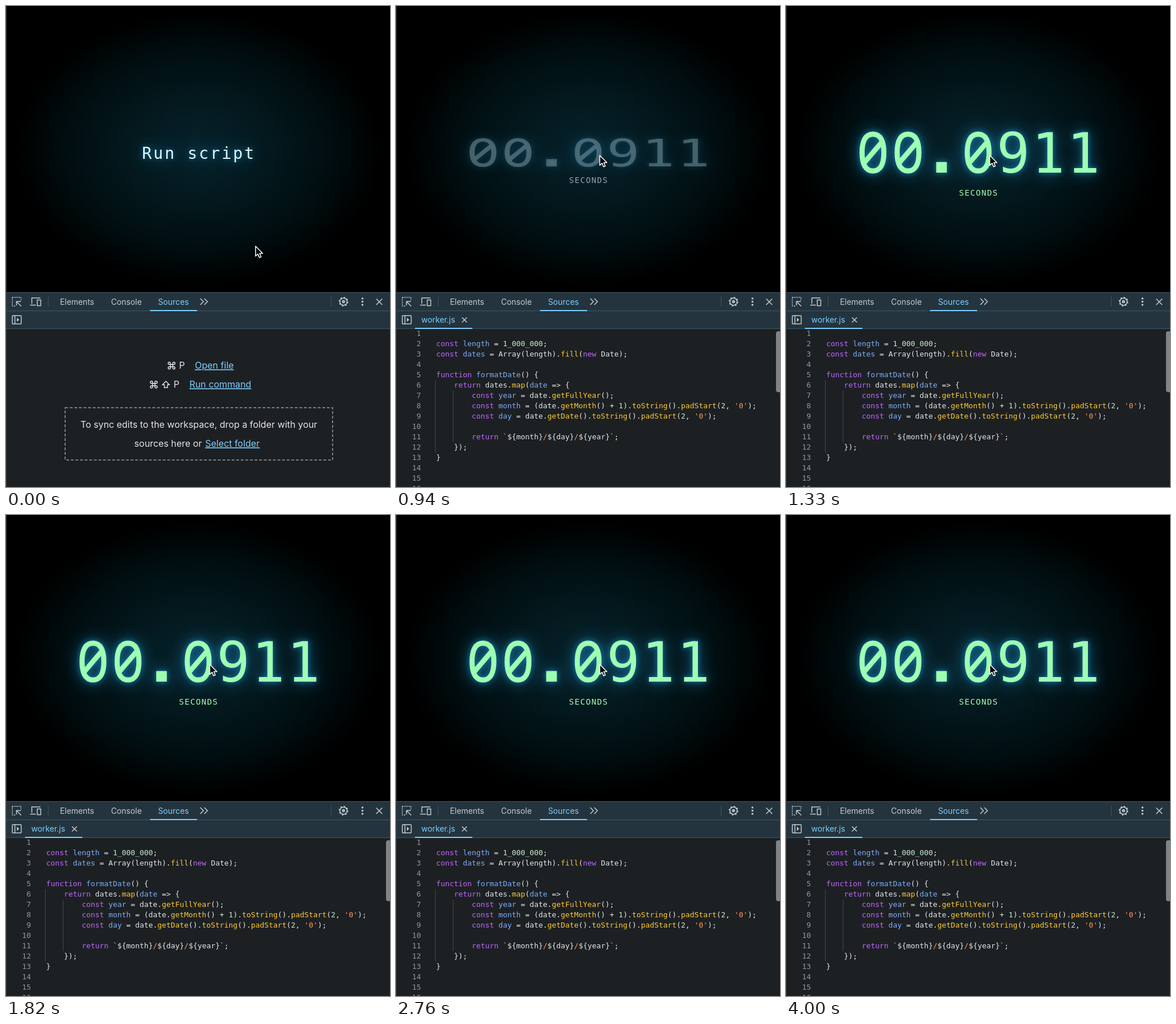
Write an HTML page that moves like this. It is 669 by 837 pixels and loops after 4.03 s.

```html
<!DOCTYPE html>
<html lang="en">
<head>
<meta charset="utf-8">
<title>Run script</title>
<style>
  html, body { margin: 0; width: 100%; height: 100%; overflow: hidden; background: #000; }
  svg { display: block; width: 669px; height: 837px; }
  text { white-space: pre; }
  .mono { font-family: "DejaVu Sans Mono", Menlo, monospace; }
  .ui { font: 13.8px Inter, sans-serif; fill: #c3cacf; }
  .active { fill: #7ccfff; }
  .help { font: 15.87px Inter, sans-serif; fill: #e3e5e7; }
  .link { fill: #7ccfff; text-decoration: underline; text-decoration-thickness: 1px; text-underline-offset: 2px; }
  .code { font-size: 12.88px; fill: #e3e5e7; }
  .number { fill: #92979b; text-anchor: end; }
  .k { fill: #bf67ff; } .d { fill: #7cacf8; } .p { fill: #fcc934; }
  .n { fill: #c4eed0; } .s { fill: #fe9a5b; }
  .icon { fill: none; stroke: #c3cacf; stroke-width: 1.5; }
</style>
</head>
<body>
<svg viewBox="0 0 669 837" xmlns="http://www.w3.org/2000/svg">
  <defs>
    <radialGradient id="vignette">
      <stop offset="0" stop-color="#06222c"/>
      <stop offset=".3" stop-color="#041a20"/>
      <stop offset=".65" stop-color="#010f12"/>
      <stop offset=".95" stop-color="#000"/>
    </radialGradient>
    <filter id="glow" filterUnits="userSpaceOnUse" x="40" y="140" width="590" height="240" color-interpolation-filters="sRGB">
      <feGaussianBlur stdDeviation="5" result="near"/>
      <feGaussianBlur in="SourceGraphic" stdDeviation="14" result="far"/>
      <feMerge><feMergeNode in="far"/><feMergeNode in="near"/></feMerge>
    </filter>
    <clipPath id="editorClip"><rect y="562" width="669" height="275"/></clipPath>
    <text id="title" class="mono" x="237" y="265.5" font-size="28" letter-spacing="2.95">Run script</text>
    <g id="digits" class="mono" font-size="96" text-anchor="middle" fill="currentColor"></g>
  </defs>

  <rect width="669" height="837"/>
  <ellipse cx="335" cy="249" rx="334" ry="249" fill="url(#vignette)"/>

  <g id="intro">
    <use id="titleGlow" href="#title" fill="#1580b0" filter="url(#glow)"/>
    <use id="titleFace" href="#title"/>
  </g>
  <g id="timer">
    <g id="counter">
      <use id="digitGlow" href="#digits" color="#1a82b4" filter="url(#glow)"/>
      <use id="digitFace" href="#digits"/>
    </g>
    <text id="unit" class="mono" x="301.5" font-size="14" letter-spacing="1.33">SECONDS</text>
  </g>

  <rect y="498" width="669" height="339" fill="#1d2023"/>
  <rect y="498" width="669" height="64" fill="#24343e"/>
  <path d="M0 498.5H669M0 530.5H669M0 561.5H669" stroke="#3f5661"/>
  <path d="M73.5 506V523M566.5 506V523" stroke="#43545e"/>
  <rect x="251" y="529" width="82" height="2" fill="#7ccfff"/>

  <g class="icon">
    <path d="M11 507H26M11 507V522H17M26 507V512" stroke-dasharray="2 1.6"/>
    <path d="M26.5 522.5L18.5 514.5M18.3 521V514.3H26"/>
    <path d="M45 518V508H60M42 520.6H52"/>
    <rect x="54.5" y="511.5" width="6" height="10"/>
    <path d="M338.5 509L344 514.5L338.5 520M345.5 509L351 514.5L345.5 520"/>
    <circle cx="588" cy="514.5" r="6.2"/>
    <circle cx="588" cy="514.5" r="7.5" stroke-width="1.6" stroke-dasharray="2.945"/>
    <circle cx="588" cy="514.5" r="1.7" stroke-width="2"/>
    <path d="M645 509.5L655.5 520M655.5 509.5L645 520"/>
    <rect x="11" y="538.8" width="15.5" height="14.5" rx="1"/>
    <path d="M15.5 539V553"/>
    <path d="M19 542.5L23 546L19 549.5Z" fill="#c3cacf" stroke="none"/>
    <g fill="#c3cacf" stroke="none">
      <circle cx="621" cy="509" r="1.7"/><circle cx="621" cy="514.5" r="1.7"/><circle cx="621" cy="520" r="1.7"/>
    </g>
  </g>
  <g class="ui">
    <text x="94" y="519.6">Elements</text>
    <text x="183" y="519.6">Console</text>
    <text x="265" y="519.6" class="active">Sources</text>
  </g>

  <g id="welcome" class="help">
    <g fill="none" stroke="#e3e5e7" stroke-width="1.4">
      <path id="command" transform="translate(288.5 625.7)" d="M-2 -2V-4a2 2 0 1 0 -2 2H4a2 2 0 1 0 -2 -2V4a2 2 0 1 0 2 -2H-4a2 2 0 1 0 2 2z"/>
      <use href="#command" x="-31" y="33"/>
      <path transform="translate(278.6 659)" d="M0 -6L6 0H2.8V5H-2.8V0H-6Z"/>
    </g>
    <text x="301.5" y="631.2">P</text>
    <text x="329" y="631.2" class="link">Open file</text>
    <text x="292" y="664.2">P</text>
    <text x="319.5" y="664.2" class="link">Run command</text>
    <rect x="103" y="699" width="466" height="91" fill="none" stroke="#777b7e" stroke-width="2" stroke-dasharray="5 3"/>
    <text x="336" y="734.2" text-anchor="middle">To sync edits to the workspace, drop a folder with your</text>
    <text x="223.5" y="767">sources here or</text>
    <text x="347" y="767" class="link">Select folder</text>
  </g>

  <g id="editor">
    <text class="ui active" x="44" y="551.2">worker.js</text>
    <path class="icon" d="M115 542L123.5 550.5M123.5 542L115 550.5"/>
    <rect x="33" y="560" width="100" height="2" fill="#7ccfff"/>
    <path d="M68.5 651V777M99.5 669V759" stroke="#43484b"/>
    <g id="lines" class="mono code" clip-path="url(#editorClip)"></g>
    <rect x="662" y="566" width="9" height="106" rx="4" fill="#808386"/>
  </g>

  <path d="M.5 0V837" stroke="#363b3e"/>

  <g id="cursor">
    <path id="arrow" d="M0 0V17.2L4 13.6L6.6 19.8L9.6 18.5L7 12.5H12.4Z" fill="#000" stroke="#fff" stroke-width="1.5" stroke-linejoin="round"/>
    <g id="hand" stroke="#000" stroke-width=".9" stroke-linejoin="round">
      <path fill="#fff" d="M-2.2 3C-2.6 .8 .6 0 1.4 2L2.8 6.4C3.2 4.8 5.4 5 5.8 6.6C6.6 5.6 8.2 6 8.5 7.4C9.6 6.6 11 7.4 11 9V13.2C10.9 15 9.8 16 9.6 18.6H1.6C1.4 16.6 -1.2 14.6 -3.2 11.6C-4.8 9.4 -2.4 8 -.6 10Z"/>
      <path fill="none" d="M3 12V16M5.4 12V16M7.8 12V16"/>
    </g>
  </g>
</svg>
<script>
const LOOP = 4030;
const MOVE_START = 80, MOVE_END = 580;
const CLICK = 835, ELAPSED = 0.0911;
const SETTLE_START = 945, SETTLE_END = 1240;
const CENTER_Y = 255;

const source = [
  "",
  "const length = 1_000_000;",
  "const dates = Array(length).fill(new Date);",
  "",
  "function formatDate() {",
  "    return dates.map(date => {",
  "        const year = date.getFullYear();",
  "        const month = (date.getMonth() + 1).toString().padStart(2, '0');",
  "        const day = date.getDate().toString().padStart(2, '0');",
  "",
  "        return `${month}/${day}/${year}`;",
  "    });",
  "}",
  "", "", ""
];

const el = id => document.getElementById(id);
const show = (id, on) => el(id).setAttribute("display", on ? "inline" : "none");
const set = (id, name, value) => el(id).setAttribute(name, value);
const mix = (a, b, k) => a + (b - a) * k;
const mixColor = (a, b, k) => `rgb(${a.map((v, i) => Math.round(mix(v, b[i], k)))})`;
const progress = (t, from, to) => Math.min(1, Math.max(0, (t - from) / (to - from)));
const easeInOut = k => k * k * (3 - 2 * k);
const easeOut = k => 1 - (1 - k) ** 3;

const token = /(?<k>\b(?:const|function|return|new)\b)|(?<d>(?<=const |function )\w+|\bdate(?= =>))|(?<p>(?<=\.)[a-z]\w*)|(?<s>'[^']*'|`|\/)|(?<n>\b\d[\d_]*)/g;

function highlight(line) {
  return line.replace(token, (match, ...rest) => {
    const groups = rest.at(-1);
    const kind = Object.keys(groups).find(key => groups[key]);
    return `<tspan class="${kind}">${match}</tspan>`;
  });
}

el("lines").innerHTML = source.map((line, i) => {
  const y = 574.2 + 17.96 * i;
  return `<text class="number" x="43.5" y="${y}">${i + 1}</text><text x="70" y="${y}">${highlight(line)}</text>`;
}).join("");

// The slashed zero and square point are drawn; other digits are text.
function digit(char, i) {
  const x = 151.5 + 61.1 * i;
  if (char === ".") return `<rect x="${x - 12}" y="271.5" width="18.5" height="18.5"/>`;
  if (char !== "0") return `<text x="${x}" y="290">${char}</text>`;
  return `<path transform="translate(${x} ${CENTER_Y})" fill="none" stroke="currentColor" stroke-width="8.8"
    d="M0 -32C13 -32 19 -20 19 0S13 32 0 32S-19 20 -19 0S-13 -32 0 -32ZM-14.5 17L14.5 -17"/>`;
}

let shown = "";
function setCounter(seconds) {
  const label = seconds.toFixed(4).padStart(7, "0");
  if (label === shown) return;
  shown = label;
  el("digits").innerHTML = [...label].map(digit).join("");
}

function render(t) {
  const move = easeInOut(progress(t, MOVE_START, MOVE_END));
  const x = mix(434.8, 355, move), y = mix(418, 260, move);
  const started = t >= CLICK;
  const hovering = y < 276 && !started;
  const hoverAt = MOVE_START + 0.8 * (MOVE_END - MOVE_START);
  const hover = easeOut(progress(t, hoverAt, hoverAt + 150));

  set("cursor", "transform", `translate(${x} ${y})`);
  show("hand", hovering);
  show("arrow", !hovering);
  show("intro", !started);
  show("welcome", !started);
  show("timer", started);
  show("editor", started);

  set("titleFace", "fill", mixColor([222, 250, 255], [126, 195, 208], hover));
  set("titleGlow", "opacity", mix(0.75, 0.9, hover));

  const done = easeOut(progress(t, SETTLE_START, SETTLE_END));
  const scale = mix(0.69, 1, done);
  setCounter(Math.min(ELAPSED, Math.max(0, (t - CLICK) / 1000)));
  set("counter", "transform", `translate(0 ${CENTER_Y * (1 - scale)}) scale(1 ${scale})`);
  set("digitFace", "color", mixColor([235, 235, 235], [158, 255, 178], done));
  set("digitFace", "opacity", mix(0.28, 1, done));
  set("digitGlow", "opacity", mix(0.3, 0.9, done));
  set("unit", "y", mix(308.2, 329.6, done));
  set("unit", "fill", mixColor([140, 164, 170], [158, 255, 178], done));
}

const start = performance.now();
function tick() {
  render((performance.now() - start) % LOOP);
  requestAnimationFrame(tick);
}
tick();
</script>
</body>
</html>
```
